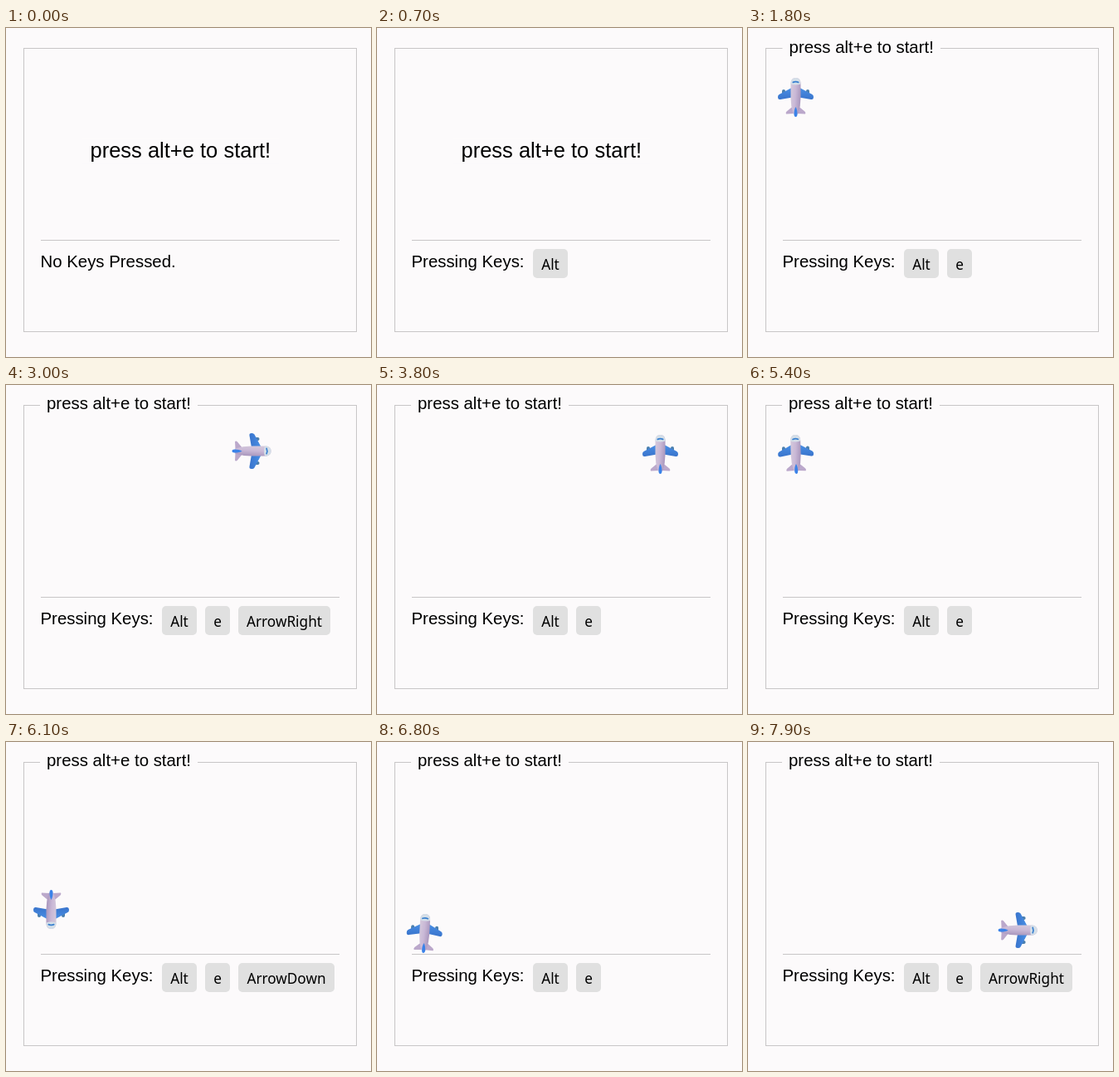
Write an HTML page that moves like this. It is 440x396 px and loops after 8 s.

```html
<!DOCTYPE html>
<html lang="en">
<head>
<meta charset="utf-8">
<title>Keyboard plane</title>
<style>
  html, body { margin: 0; width: 100%; height: 100%; overflow: hidden; background: #fcfafb; }
  svg { display: block; width: 440px; height: 396px; }
  .label { font: 20.4px "Liberation Sans", Arial, sans-serif; }
  .key text { font: 17.2px "Noto Sans", sans-serif; text-anchor: middle; }
  .key rect { fill: #e0e0e0; }
</style>
</head>
<body>
<svg viewBox="0 0 440 396" xmlns="http://www.w3.org/2000/svg">
  <defs>
    <linearGradient id="hull" x1="0" x2="1" y1="0" y2="0.25">
      <stop offset="0" stop-color="#d6cbdc"/>
      <stop offset="0.55" stop-color="#c9b8d6"/>
      <stop offset="1" stop-color="#ad9bc0"/>
    </linearGradient>
    <linearGradient id="wing" x1="0" x2="0" y1="0" y2="1">
      <stop offset="0" stop-color="#4a90e6"/>
      <stop offset="1" stop-color="#3974cc"/>
    </linearGradient>
  </defs>
  <rect x="21.5" y="24.5" width="401" height="341" fill="none" stroke="#c8c6c7"/>
  <path d="M42 255.5H402" stroke="#c8c6c7"/>

  <g id="title">
    <rect x="-8" y="-19" width="190" height="24" fill="#fcfafb"/>
    <text class="label">press alt+e to start!</text>
  </g>

  <!-- origin is the turning point; the nose points up -->
  <g id="plane">
    <g transform="translate(1.5 0)">
      <g fill="#4b7fae">
        <rect x="-16.5" y="-4" width="4" height="7" rx="2"/>
        <rect x="12.5" y="-4" width="4" height="7" rx="2"/>
      </g>
      <g fill="url(#wing)">
        <path id="side" d="M-4-6.5L-20 2Q-21.8 3.2-21.5 5.5Q-21.3 8.6-18.5 8L-4 5.5Z"/>
        <path d="M4-6.5L20 2Q21.8 3.2 21.5 5.5Q21.3 8.6 18.5 8L4 5.5Z"/>
      </g>
      <path d="M-3 16L-11 22.5Q-12.5 24-11.5 25.5L-2 25H2L11.5 25.5Q12.5 24 11 22.5L3 16Z" fill="#bba8cb"/>
      <path d="M0-18C4.2-18 6-15 6-10.5V6Q6 16 3 25Q0 27.5-3 25Q-6 16-6 6V-10.5C-6-15-4.2-18 0-18Z" fill="url(#hull)"/>
      <path d="M0-18C4.2-18 6-15 6-10.5Q0-8.5-6-10.5C-6-15-4.2-18 0-18Z" fill="#d5dfe8"/>
      <path d="M-3.2-12.6Q0-14 3.2-12.6" fill="none" stroke="#3980d0" stroke-width="1.7" stroke-linecap="round"/>
      <path d="M0 17Q2 20 2 26Q1.8 29 0 29Q-1.8 29-2 26Q-2 20 0 17Z" fill="#3b82e8"/>
    </g>
  </g>

  <text class="label" id="status" x="41.5" y="288"></text>
  <g id="keys"></g>
</svg>
<script>
const LOOP = 8000, STEP = 100;
const LEFT = 56, RIGHT = 340, TOP = 78, BOTTOM = 225;
const $ = id => document.getElementById(id);

// name, left, width, then pairs of press and release times
const KEYS = [
  ["Alt", 188, 42, [500, LOOP]],
  ["e", 240, 30, [1500, LOOP]],
  ["ArrowRight", 280, 111, [2400, 3500, 7300, LOOP]],
  ["ArrowLeft", 280, 100, [4100, 5200]],
  ["ArrowDown", 280, 116, [5800, 6600]]
];
// start, duration, from, to
const MOVE_X = [
  [2392, 800, LEFT, RIGHT],
  [4052, 800, RIGHT, LEFT],
  [7299, 680, LEFT, RIGHT]
];
const MOVE_Y = [[5760, 440, TOP, BOTTOM]];
const TURN = [
  [2380, 240, 0, 90], [3480, 300, 90, 0],
  [4080, 240, 0, -90], [5180, 240, -90, 0],
  [5780, 300, 0, 180], [6580, 240, 180, 0],
  [7280, 240, 0, 90]
];

const clamp = v => Math.min(1, Math.max(0, v));
const mix = (a, b, p) => a + (b - a) * p;
const ease = p => (1 - Math.cos(Math.PI * p)) / 2;

function track(moves, t) {
  let value = moves[0][2];
  for (const [start, time, from, to] of moves)
    if (t >= start) value = mix(from, to, ease(clamp((t - start) / time)));
  return value;
}

function spring(t) {
  if (t <= 0) return 0;
  const w = 17.5, damp = 12.8;
  return 1 - Math.exp(-damp * t) * (Math.cos(w * t) + damp / w * Math.sin(w * t));
}

function isDown(times, t) {
  for (let i = 0; i < times.length; i += 2)
    if (t >= times[i] && t < times[i + 1]) return true;
  return false;
}

$("keys").innerHTML = KEYS.map(([name, x, w]) =>
  `<g class="key"><rect x="${x}" y="266" width="${w}" height="35" rx="5"/>` +
  `<text x="${x + w / 2}" y="291">${name}</text></g>`).join("");
const caps = [...$("keys").children];

function draw(now) {
  const t = Math.floor(now % LOOP / STEP) * STEP;

  const p = t < 1500 ? 0 : spring((t - 1440) / 1000);
  $("title").setAttribute("transform",
    `translate(${mix(101.5, 49, p)} ${mix(156.3, 29, p)}) scale(${mix(1.25, 1, p)})`);

  $("plane").setAttribute("transform",
    `translate(${track(MOVE_X, t)} ${track(MOVE_Y, t)}) rotate(${track(TURN, t)})`);
  $("plane").setAttribute("opacity", t < 1500 ? 0 : clamp((t - 1440) / 300));

  $("status").textContent = t < 500 ? "No Keys Pressed." : "Pressing Keys:";
  KEYS.forEach((key, i) => {
    caps[i].style.display = isDown(key[3], t) ? "" : "none";
  });
}

const begin = performance.now();
function tick() {
  draw(performance.now() - begin);
  requestAnimationFrame(tick);
}
tick();
</script>
</body>
</html>
```
